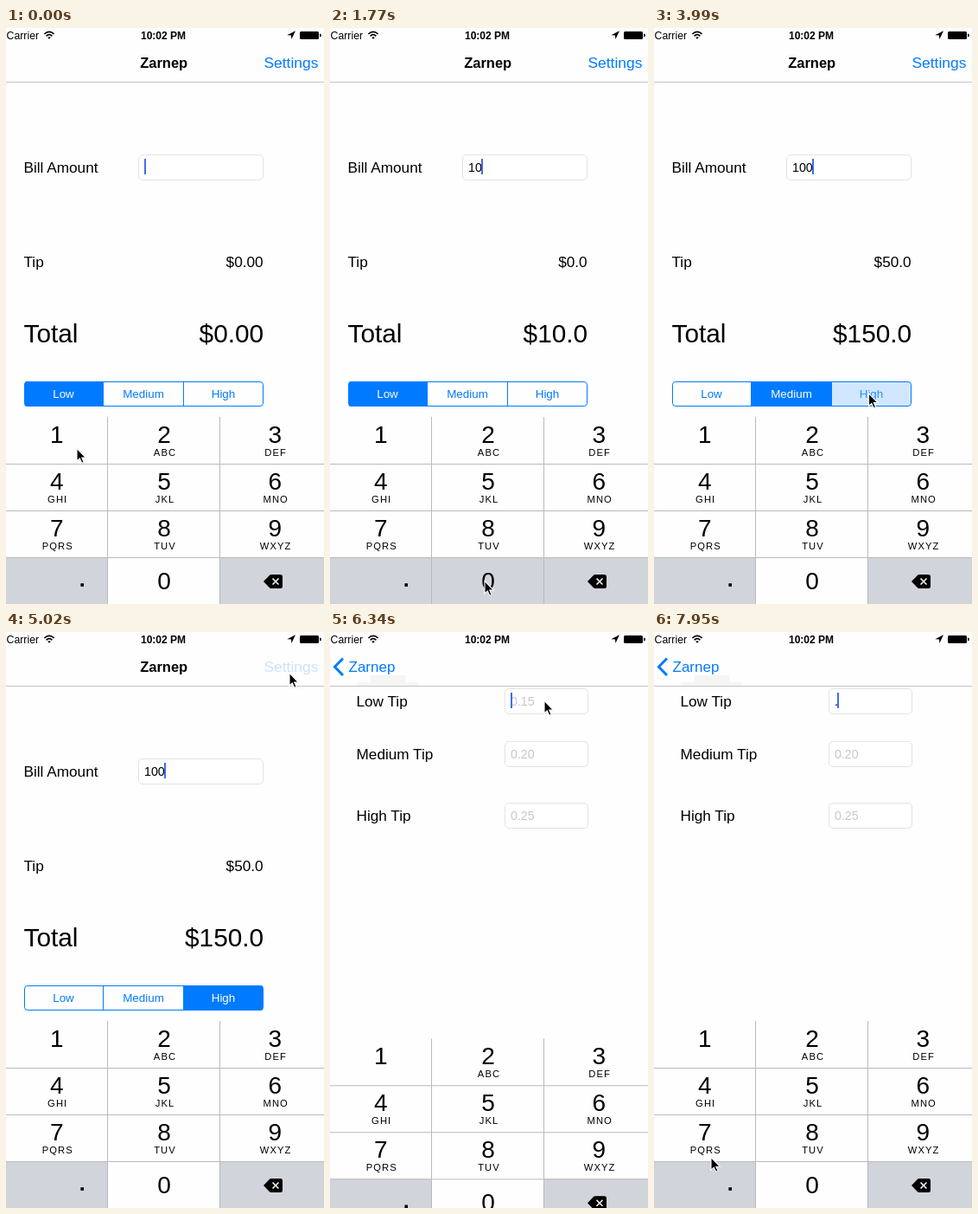
An HTML page for the animation above (8000 ms loop, 368x665 px).

```html
<!DOCTYPE html>
<html lang="en">
<head>
<meta charset="utf-8">
<title>Tip calculator</title>
<style>
html, body { margin: 0; width: 100%; height: 100%; overflow: hidden; background: #fefefe; }
svg { display: block; width: 100vw; height: 100vh; }
text { font: 17.2px "Liberation Sans", Arial, sans-serif; white-space: pre; }
.mid { text-anchor: middle; }
.end { text-anchor: end; }
.blue { fill: #007aff; }
.bold { font-weight: bold; }
.big { font-size: 29.8px; }
.entry { font-size: 14.2px; }
.hint { font-size: 14.2px; fill: #c7c7cd; }
.field { fill: #fff; stroke: #e3e3e3; }
.caret { fill: #426bf2; }
.digit { font-size: 28px; }
.abc { font-size: 11.2px; letter-spacing: 1.1px; }
.key { fill: #fefefe; }
.key.gray, .key.down { fill: #d1d4db; }
.rule { fill: #b9babd; }
.seg rect { fill: #fefefe; }
.seg text { font-size: 13.4px; fill: #007aff; }
.seg.on rect { fill: #007aff; }
.seg.on text { fill: #fff; }
.seg.down rect { fill: #d1e7ff; }
.seg.down text { fill: #2a8fff; }

/* one 8 s timeline: push runs 64.25% - 70.25% */
.anim { animation: 8s linear infinite paused; }
.back { animation-name: back; }
.dim { animation-name: dim; }
.push { animation-name: push; }
.nudge { animation-name: nudge; }
.rise { animation-name: rise; }
.title { animation-name: title; }
.label { animation-name: label; }
.chevron { animation-name: chevron; }
.settings { animation-name: settings; }
@keyframes back {
  0%, 64.25% { transform: translateX(0); animation-timing-function: cubic-bezier(.333,1,.667,1); }
  70.25%, 100% { transform: translateX(-111px); }
}
@keyframes dim {
  0%, 64.25% { opacity: 0; animation-timing-function: cubic-bezier(.333,1,.667,1); }
  70.25%, 100% { opacity: .1; }
}
@keyframes push {
  0%, 64.25% { transform: translateX(378px); animation-timing-function: cubic-bezier(.333,1,.667,1); }
  70.25%, 100% { transform: translateX(0); }
}
@keyframes nudge {
  0%, 68.4% { transform: translateX(4.5px); }
  70.25%, 100% { transform: translateX(0); }
}
@keyframes rise {
  0%, 75.75% { transform: translateY(216px); animation-timing-function: cubic-bezier(.333,1,.667,1); }
  82.125%, 100% { transform: translateY(0); }
}
@keyframes title {
  0%, 64.25% { transform: translateX(0); opacity: 1; animation-timing-function: cubic-bezier(.333,1,.667,1); }
  70.25%, 100% { transform: translateX(-133px); opacity: 0; }
}
@keyframes label {
  0%, 64.25% { transform: translateX(133px); opacity: 0; animation-timing-function: cubic-bezier(.333,1,.667,1); }
  70.25%, 100% { transform: translateX(0); opacity: 1; }
}
@keyframes chevron {
  0%, 64.25% { opacity: 0; }
  68.2% { opacity: .4; }
  70.25%, 100% { opacity: 1; }
}
@keyframes settings {
  0%, 62.3% { opacity: 1; }
  62.4%, 64.2% { opacity: .2; }
  64.25% { opacity: 1; animation-timing-function: cubic-bezier(.333,1,.667,1); }
  70.25%, 100% { opacity: 0; }
}
</style>
</head>
<body>
<svg viewBox="0 0 368 665" preserveAspectRatio="none">
  <defs>
    <linearGradient id="shade">
      <stop offset="0" stop-opacity="0"/>
      <stop offset="1" stop-opacity=".22"/>
    </linearGradient>
  </defs>
  <rect width="368" height="665" fill="#fefefe"/>

  <g class="anim back">
    <text x="20.5" y="166.5">Bill Amount</text>
    <rect class="field" x="153.5" y="146.5" width="144" height="29" rx="4.5"/>
    <text class="entry" id="bill" x="160" y="165.5"></text>
    <rect class="caret" id="billCaret" y="151" width="2" height="18"/>
    <text x="20.5" y="275.7">Tip</text>
    <text class="end" id="tip" x="297.6" y="275.7"></text>
    <text class="big" x="20.5" y="363.4">Total</text>
    <text class="big end" id="total" x="298.2" y="363.4"></text>
  </g>
  <rect class="anim dim" width="368" height="665"/>
  <g class="anim back">
    <g id="segs"></g>
    <g id="padA"></g>
  </g>

  <g class="anim push">
    <rect x="-9" width="9" height="665" fill="url(#shade)"/>
    <rect width="368" height="665" fill="#fefefe"/>
    <g class="anim nudge" id="rows"></g>
    <g class="anim rise" id="padB"></g>
  </g>

  <rect width="368" height="62" fill="#fefefe" fill-opacity=".82"/>
  <g class="anim push" fill="#f5f5f5">
    <rect x="31" y="58" width="71" height="4"/>
    <rect x="47" y="50" width="40" height="8"/>
  </g>
  <rect y="62" width="368" height="1" fill="#c4c4c4"/>
  <g class="anim title"><text class="mid bold" x="182.7" y="46" style="font-size:16.5px">Zarnep</text></g>
  <g class="anim label"><text class="blue" x="21.5" y="46" style="font-size:17px">Zarnep</text></g>
  <path class="anim chevron" d="M15 30.5 5.5 40.2 15 50" fill="none" stroke="#007aff" stroke-width="3"/>
  <text class="anim settings blue" x="298.5" y="46" style="font-size:17.4px">Settings</text>

  <text x="0.5" y="12.5" style="font-size:12.3px">Carrier</text>
  <g fill="none" stroke="#000" stroke-width="1.7">
    <path d="M44.4 7Q50 1.8 55.6 7M46.6 9.4Q50 6 53.4 9.4"/>
    <path d="M48.2 11Q50 9.5 51.8 11L50 12.8Z" fill="#000" stroke="none"/>
  </g>
  <text class="mid bold" x="182" y="12.7" style="font-size:12px">10:02 PM</text>
  <path d="M335 3.2 325.4 8.3 330 8.6 330.4 13Z"/>
  <rect x="340" y="4" width="22" height="9" rx="1.5"/>
  <path d="M363 6.5Q365 7 365 8.5T363 10.5Z"/>

  <g id="pointer">
    <path d="M1 2V15.5L4 13 6.5 18 9 17 6.8 12H11Z" opacity=".22"/>
    <path d="M0 .4V15L3.3 12 5.7 17.2 8.1 16.2 5.8 11.1H10.4Z" stroke="#fff" stroke-width="1.1"/>
  </g>
</svg>
<script>
const LOOP = 8000, FRAME = 147.3;
const $ = id => document.getElementById(id);

function keypad() {
  const letters = ['', 'ABC', 'DEF', 'GHI', 'JKL', 'MNO', 'PQRS', 'TUV', 'WXYZ'];
  const left = [0, 118, 248], width = [117, 129, 120], mid = [58.7, 183, 311.2];
  const cell = (c, r, cls, n) =>
    `<rect class="key ${cls}" data-key="${n}" x="${left[c]}" y="${449 + r * 54}" width="${width[c]}" height="54"/>`;
  let keys = '', marks = '';
  letters.forEach((word, i) => {
    const c = i % 3, r = Math.floor(i / 3), y = 449 + r * 54;
    keys += cell(c, r, '', i + 1);
    marks += `<text class="digit mid" x="${mid[c]}" y="${y + 29.7}">${i + 1}</text>
      <text class="abc mid" x="${mid[c] + 1}" y="${y + 45}">${word}</text>`;
  });
  keys += cell(0, 3, 'gray', 'dot') + cell(1, 3, '', 0) + cell(2, 3, 'gray', 'del');
  for (const y of [503, 557, 611]) keys += `<rect class="rule" y="${y}" width="368" height="1"/>`;
  for (const x of [117, 247]) keys += `<rect class="rule" x="${x}" y="449" width="1" height="216"/>`;
  return keys + marks + `<text class="digit mid" x="183" y="648">0</text>
    <rect x="86.4" y="641.2" width="3.6" height="3.6"/>
    <path d="M298 639 304.5 632.2Q305.5 631 307 631H317.5Q320 631 320 633.5V644.5Q320 647 317.5 647H307Q305.5 647 304.5 645.8Z"/>
    <path d="M308.5 635.5 315.5 642.5M315.5 635.5 308.5 642.5" stroke="#fff" stroke-width="1.5"/>`;
}

function segments() {
  const edges = [21.5, 112.5, 205.5, 297.5];
  const names = ['Low', 'Medium', 'High'], mid = [66.5, 159, 251.5];
  return `<clipPath id="round"><rect x="21" y="408" width="277" height="29" rx="3.8"/></clipPath>
    <g clip-path="url(#round)">` + names.map((name, i) =>
    `<g class="seg"><rect x="${edges[i]}" y="408" width="${edges[i + 1] - edges[i]}" height="29"/>
      <text class="mid" x="${mid[i]}" y="427">${name}</text></g>`).join('') +
    `</g><path d="M112.5 408V437M205.5 408V437" stroke="#007aff"/>
    <rect x="21.5" y="408.5" width="276" height="28" rx="3.3" fill="none" stroke="#007aff"/>`;
}

function rows() {
  const row = (name, hint, y, id) => `<text x="30.5" y="${y + 21}">${name}</text>
    <rect class="field" x="202.5" y="${y + .5}" width="96" height="29" rx="4.5"/>
    <text class="hint" ${id} x="209" y="${y + 20}">${hint}</text>`;
  return row('Low Tip', '0.15', 65, 'id="hint"') + row('Medium Tip', '0.20', 126, '') +
    row('High Tip', '0.25', 197, '') +
    `<text class="entry" id="low" x="209" y="85"></text>
    <rect class="caret" id="lowCaret" y="70" width="2" height="18"/>`;
}

$('segs').innerHTML = segments();
$('padA').innerHTML = $('padB').innerHTML = keypad();
$('rows').innerHTML = rows();

// [ms, value...]: the last entry reached applies
const sums = [[0, '', '$0.00', '$0.00'], [870, '1', '$0.0', '$1.0'], [1750, '10', '$0.0', '$10.0'],
  [2050, '100', '$0.0', '$100.0'], [3080, '100', '$50.0', '$150.0']];
const presses = [[0, ''], [700, '1'], [870, ''], [1600, '0'], [1900, ''], [2050, '0'], [2200, '']];
const choices = [[0, 0, -1], [2930, 0, 1], [3230, 1, -1], [3960, 1, 2], [4110, 2, -1]];
const edits = [[0], [870], [1750], [2050], [6040], [7650]];
const path = [[0, 82, 485], [140, 82, 483], [295, 82, 483], [700, 66, 475], [890, 66, 475],
  [1180, 130, 500], [1330, 130, 500], [1620, 179, 638], [2220, 179, 638], [2515, 176, 466],
  [2800, 173.5, 421.5], [3400, 173.5, 421.5], [3830, 248.5, 421.5], [4130, 248.5, 421.5], [4280, 262, 370],
  [4570, 324, 118], [4730, 329, 60], [4880, 328, 47], [5610, 328, 47], [5760, 300, 72],
  [6040, 248, 79], [6490, 248, 79], [6780, 243, 130], [6930, 215, 240], [7220, 130, 510],
  [7510, 58, 643], [7810, 58, 643], [7960, 66, 606]];

const latest = (list, t) => list.filter(e => e[0] <= t).pop();

function pointerAt(t) {
  const i = Math.max(1, path.findIndex(p => p[0] >= t));
  const [a, b] = [path[i - 1], path[i]];
  const f = (t - a[0]) / (b[0] - a[0]);
  return [a[1] + (b[1] - a[1]) * f, a[2] + (b[2] - a[2]) * f];
}

function placeCaret(caret, text, shown) {
  caret.setAttribute('x', Math.floor(+text.getAttribute('x') + text.getComputedTextLength()));
  caret.style.visibility = shown ? 'visible' : 'hidden';
}

const anims = document.getAnimations();
const segs = [...document.querySelectorAll('.seg')];
const keys = [...$('padA').querySelectorAll('.key')];

function draw(t) {
  anims.forEach(a => { a.currentTime = t; });

  const [, bill, tip, total] = latest(sums, t);
  $('bill').textContent = bill;
  $('tip').textContent = tip;
  $('total').textContent = total;

  const typed = t >= 7650;
  $('low').textContent = typed ? '.' : '';
  $('hint').style.visibility = typed ? 'hidden' : 'visible';

  const phase = (t - latest(edits, t)[0]) % 1000;
  const lit = phase < 550 || phase >= 850;
  placeCaret($('billCaret'), $('bill'), lit && t < 5140);
  placeCaret($('lowCaret'), $('low'), lit && t >= 6040);

  const pressed = latest(presses, t)[1];
  keys.forEach(k => k.classList.toggle('down', k.dataset.key === pressed));

  const [, on, down] = latest(choices, t);
  segs.forEach((s, i) => {
    s.classList.toggle('on', i === on);
    s.classList.toggle('down', i === down);
  });

  $('pointer').setAttribute('transform', `translate(${pointerAt(t)})`);
}

// the screen refreshes about seven times a second
const start = performance.now();
function tick() {
  const t = (performance.now() - start) % LOOP;
  draw(Math.floor((t + 5) / FRAME) * 147.4);
  requestAnimationFrame(tick);
}
tick();
</script>
</body>
</html>
```
